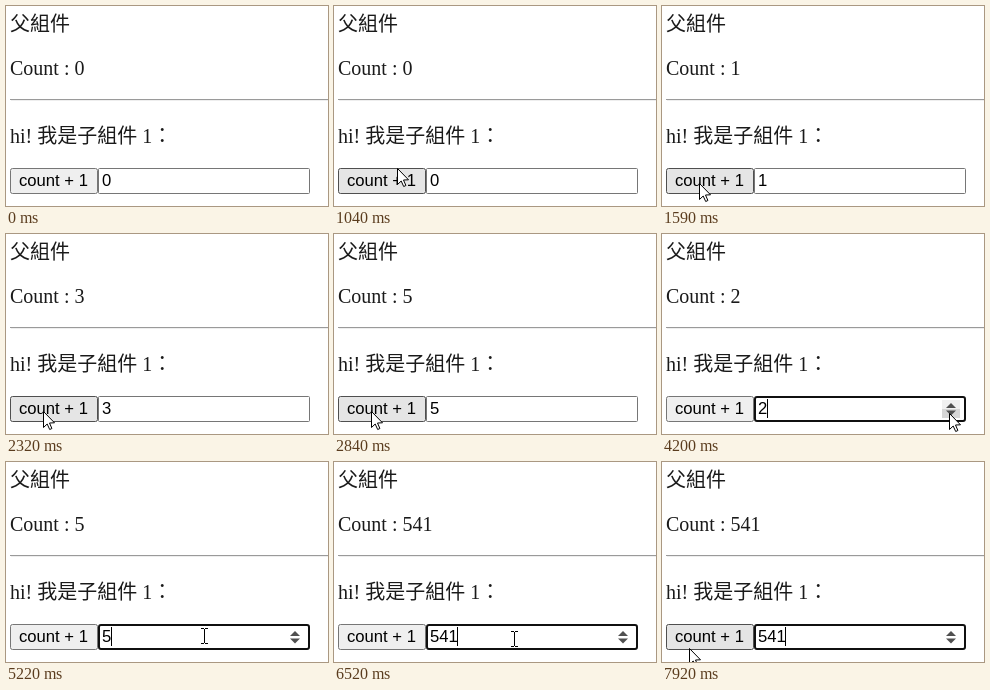
Animation, 322 px wide and 200 px high, one loop 7.99 s. Source, as an HTML page with a canvas:

```html
<!DOCTYPE html>
<html lang="zh-Hant">
<head>
<meta charset="utf-8">
<title>父組件 / 子組件</title>
<style>
  html, body { margin: 0; width: 100%; height: 100%; overflow: hidden; background: #fff; }
  canvas { display: block; width: 322px; height: 200px; }
</style>
</head>
<body>
<canvas id="stage" width="322" height="200"></canvas>
<script>
const ctx = document.getElementById('stage').getContext('2d');
const LOOP = 7990, TICK = 68;
const SERIF = '300 20px "Liberation Serif", "Noto Sans CJK TC", "Noto Sans CJK", serif';
const SANS = '16.667px "Liberation Sans", sans-serif';

const BUTTON = { x: 4, y: 162, w: 88, h: 26 };
const INPUT = { x: 92, y: 162, w: 212, h: 26 };
const SPIN = { x: 280, y: 166, w: 18, h: 18 };

// The pointer swings in along a cubic curve, then glides from stop to stop.
const ENTER = 330, ARRIVE = 1040;
const curveX = [294, 280, 170, 63], curveY = [173, 40, 20, 162];
const stops = [
  { t: ARRIVE, x: 63, y: 162 },
  { t: 1110, x: 52, y: 167 },
  { t: 1320, x: 37, y: 177, until: 2910 },
  { t: 3530, x: 287, y: 179, until: 4330 },
  { t: 4400, x: 292, y: 173, until: 5070 },
  { t: 5220, x: 198, y: 174 },
  { t: 5360, x: 180, y: 177, until: 7510 },
  { t: 7920, x: 27, y: 186 }
];

const burst = (start, times, gap, hold, step, onPress) =>
  Array.from({ length: times }, (_, i) => {
    const down = start + i * gap, up = down + hold;
    return { down, up, step, fires: onPress ? down : up };
  });

const clicks = [
  ...burst(1530, 1, 0, 60, 1, false),
  ...burst(2050, 3, 200, 65, 1, false),
  ...burst(2710, 1, 0, 130, 1, false),
  ...burst(3800, 3, 165, 70, -1, true),
  ...burst(4330, 1, 0, 70, -1, true),
  ...burst(4600, 4, 133, 67, 1, true),
  ...burst(5430, 1, 0, 140, 0, true)
];

const FOCUS = 3800, TYPE = 6250, KEY_GAP = 270, BLINK = 530;
const TYPED = '41';

const inside = (p, r) =>
  p && p.x >= r.x && p.x < r.x + r.w && p.y >= r.y && p.y < r.y + r.h;

const mix = (a, b, k) => Math.round(a + (b - a) * k);

function bezier([a, b, c, d], k) {
  const m = 1 - k;
  return Math.round(m * m * m * a + 3 * m * m * k * b + 3 * m * k * k * c + k * k * k * d);
}

// Progress in whole ticks, as the pointer was sampled
function ticked(t, t0, t1) {
  const n = Math.max(1, Math.round((t1 - t0) / TICK));
  return Math.min(1, Math.max(0, Math.floor((t - t0) / (t1 - t0) * n + 0.02) / n));
}

function pointerAt(t) {
  if (t < ENTER) return null;
  if (t < ARRIVE) {
    const k = ticked(t, ENTER, ARRIVE);
    return { x: bezier(curveX, k), y: bezier(curveY, k) };
  }
  const i = stops.findLastIndex(s => t >= s.t);
  const from = stops[i], to = stops[i + 1];
  if (!to) return from;
  const k = ticked(t, from.until || from.t, to.t);
  return { x: mix(from.x, to.x, k), y: mix(from.y, to.y, k) };
}

function valueAt(t) {
  const count = clicks.reduce((n, c) => n + (t >= c.fires ? c.step : 0), 0);
  const keys = Math.max(0, Math.floor((t - TYPE) / KEY_GAP) + 1);
  return count + TYPED.slice(0, keys);
}

// The caret blinks after the last click or key press
function caretAt(t) {
  if (t < FOCUS) return false;
  const lastKey = TYPE + KEY_GAP;
  const since = t >= lastKey ? t - lastKey : t >= TYPE ? 0 : Math.max(0, t - 5500);
  return Math.floor(since / BLINK) % 2 === 0;
}

function text(s, x, y, font, color) {
  ctx.font = font;
  ctx.fillStyle = color;
  ctx.fillText(s, x, y);
}

function rect(x, y, w, h, color) {
  ctx.fillStyle = color;
  ctx.fillRect(x, y, w, h);
}

function box({ x, y, w, h }, fill, line, width, radius) {
  const d = width / 2;
  ctx.beginPath();
  ctx.roundRect(x + d, y + d, w - width, h - width, radius);
  ctx.fillStyle = fill;
  ctx.fill();
  ctx.strokeStyle = line;
  ctx.lineWidth = width;
  ctx.stroke();
}

function polygon(points, fill) {
  ctx.beginPath();
  points.forEach(([x, y]) => ctx.lineTo(x, y));
  ctx.closePath();
  ctx.fillStyle = fill;
  ctx.fill();
}

function drawSpinner(p) {
  const mid = SPIN.y + SPIN.h / 2, cx = SPIN.x + SPIN.w / 2;
  if (inside(p, INPUT) && p.x >= SPIN.x) {
    rect(SPIN.x, SPIN.y, SPIN.w, SPIN.h, '#f0f0f0');
    rect(SPIN.x, p.y < mid ? SPIN.y : mid, SPIN.w, SPIN.h / 2, '#d6d6d6');
  }
  for (const [base, tip] of [[174, 169], [176.5, 181.5]]) {
    polygon([[cx - 5, base], [cx, tip], [cx + 5, base]], '#505050');
  }
}

function drawArrow({ x, y }) {
  ctx.save();
  ctx.translate(x + 0.5, y + 0.5);
  polygon([[0, 0], [0, 16], [3.7, 12.5], [6.2, 18], [8.4, 17], [6, 11.5], [11, 11.3]], '#fff');
  ctx.strokeStyle = '#000';
  ctx.lineWidth = 1;
  ctx.stroke();
  ctx.restore();
}

function drawBeam({ x, y }) {
  rect(x, y - 7, 1, 14, '#000');
  for (const dy of [-8, 7]) {
    rect(x - 3, y + dy, 3, 1, '#000');
    rect(x + 1, y + dy, 3, 1, '#000');
  }
}

function draw(t) {
  const p = pointerAt(t);
  const value = valueAt(t);
  const pressed = clicks.some(c => t >= c.down && t < c.up);
  const focused = t >= FOCUS;
  const overButton = inside(p, BUTTON), overInput = inside(p, INPUT);

  rect(0, 0, 322, 200, '#fff');
  text('父組件', 4, 25, SERIF, '#1a1a1a');
  text('Count : ' + value, 4, 69, SERIF, '#1a1a1a');
  rect(4, 93, 318, 1, '#9a9a9a');
  rect(5, 94, 317, 1, '#eee');
  text('hi! 我是子組件 1：', 4, 137, SERIF, '#1a1a1a');

  const [fill, line] = !overButton ? ['#efefef', '#767676']
    : pressed ? ['#f5f5f5', '#8d8d8d'] : ['#e5e5e5', '#4f4f4f'];
  box(BUTTON, fill, line, 1, 2);
  text('count + 1', 13, 180, SANS, '#000');

  if (focused) box(INPUT, '#fff', '#101010', 2, 2);
  else box(INPUT, '#fff', overInput ? '#4f4f4f' : '#767676', 1, 1);
  text(value, 96, 180, SANS, '#000');
  if (caretAt(t)) rect(Math.floor(96 + ctx.measureText(value).width), 165, 1, 19, '#000');
  if (focused || overInput) drawSpinner(p);

  if (!p) return;
  if (pressed) {
    ctx.fillStyle = 'rgba(255, 255, 0, 0.47)';
    ctx.beginPath();
    ctx.arc(p.x, p.y, 15, 0, Math.PI * 2);
    ctx.fill();
  }
  if (overInput && p.x < SPIN.x) drawBeam(p);
  else drawArrow(p);
}

const start = performance.now();
function loop() {
  draw((performance.now() - start) % LOOP);
  requestAnimationFrame(loop);
}
loop();
</script>
</body>
</html>
```
